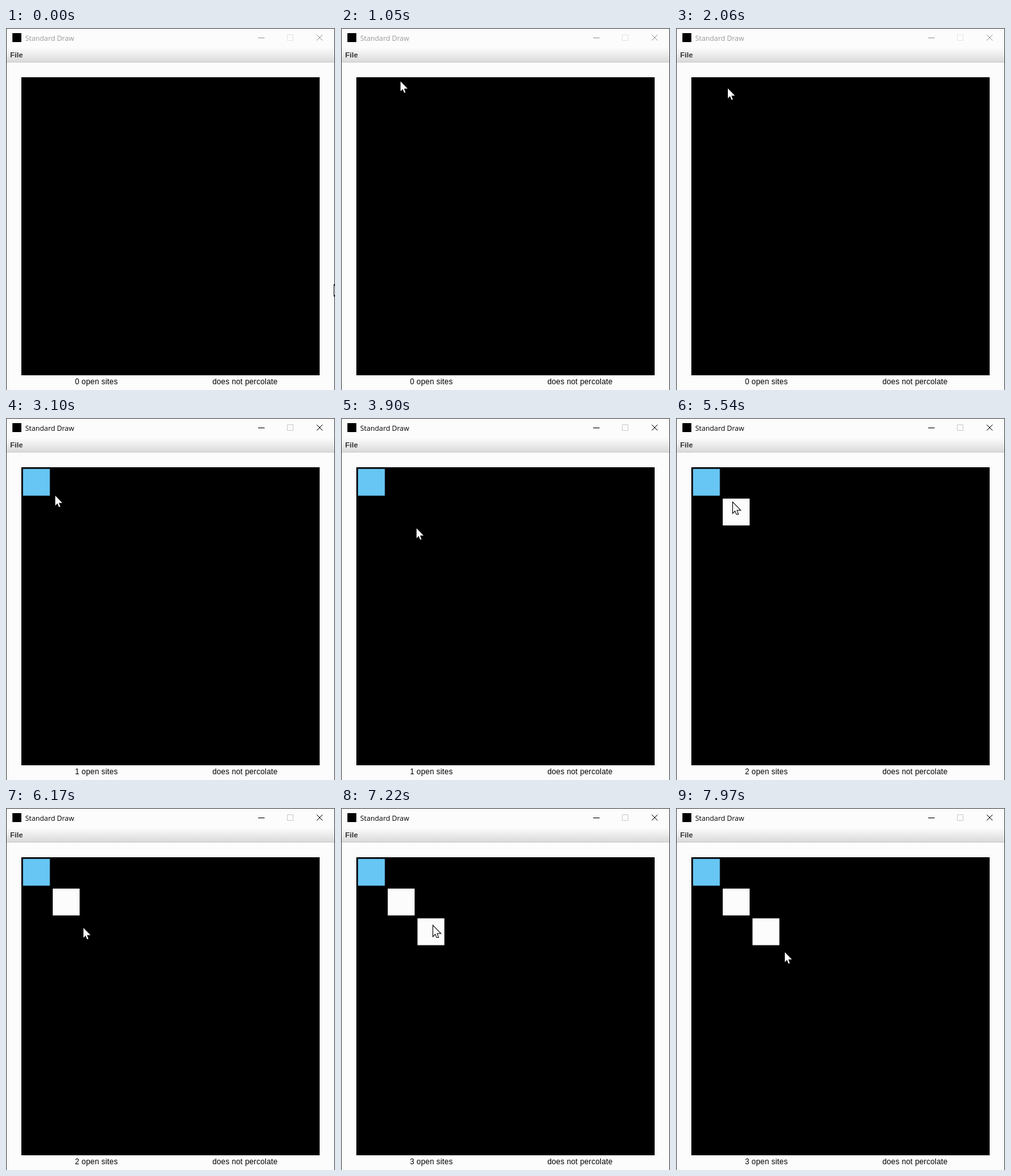
An HTML page for the animation above (8 s loop, 514x566 px).

```html
<!DOCTYPE html>
<html lang="en">
<head>
<meta charset="utf-8">
<title>Percolation</title>
<style>
  html, body { margin: 0; width: 100%; height: 100%; overflow: hidden; background: #fcfcfc; }
  svg { display: block; width: 514px; height: 566px; }
  #frame { --ink: #999; --box: #e4e4e4; }
  #frame.active { --ink: #000; --box: #ccc; }
  .title { font: 11px "Open Sans", "Noto Sans", sans-serif; fill: var(--ink); }
  .menu { font: bold 11.5px "Liberation Sans", Arial, sans-serif; fill: #333; }
  .status { font: 12px "Liberation Sans", Arial, sans-serif; letter-spacing: .18px; text-anchor: middle; }
</style>
</head>
<body>
<svg id="frame" viewBox="0 0 514 566">
  <defs>
    <linearGradient id="bar" x2="0" y2="1">
      <stop offset="0" stop-color="#fcfcfc"/>
      <stop offset="1" stop-color="#dadada"/>
    </linearGradient>
  </defs>
  <rect width="514" height="566" fill="#fcfcfc"/>
  <rect x="1" y="31" width="512" height="22" fill="url(#bar)"/>
  <path d="M1 53.5H513" stroke="#ccc"/>
  <path d="M.5 566V.5H513.5V566" fill="none" stroke="#444"/>

  <rect x="10" y="8" width="14" height="14"/>
  <text class="title" x="30" y="20">Standard Draw</text>
  <path d="M394 15.5H404M485.5 10.5l9 9m0-9l-9 9" stroke="var(--ink)"/>
  <path d="M439.5 10.5h9v9h-9z" fill="none" stroke="var(--box)"/>
  <text class="menu" x="6.6" y="46">File</text>

  <rect x="24" y="77" width="466" height="466"/>
  <g id="cells"></g>
  <text class="status" id="count" x="141.2" y="557">0 open sites</text>
  <text class="status" x="373.4" y="557">does not percolate</text>
  <path id="cursor" d="M0-.5V15L3.4 11.5 5.6 17H7.8L5.6 10.8H11Z"
        fill="#fcfcfc" stroke="#000" stroke-width="2" paint-order="stroke"/>
</svg>
<script>
const LOOP = 8000, ACTIVE_AT = 2690, CELL = 46.5;
const openTimes = [2730, 5450, 7220];
const home = [513, 403];
// Pointer moves: start, end, x, y; it rests in between
const moves = [
  [130, 1050, 93, 84],
  [1640, 2060, 81, 95], [2060, 2390, 62, 92],
  [2900, 3100, 77, 122], [3100, 3610, 103, 159], [3820, 3990, 135, 188],
  [4160, 4660, 94, 148], [4910, 5030, 89, 133],
  [5670, 6170, 121, 188], [6170, 6500, 144, 185],
  [7470, 7970, 170, 226]
];
const get = id => document.getElementById(id);
const frame = get("frame"), count = get("count"), cursor = get("cursor");

const cells = openTimes.map((_, i) => {
  const cell = document.createElementNS(frame.namespaceURI, "rect");
  const attrs = {
    x: 26.5 + CELL * i, y: 79.5 + CELL * i,
    width: 42, height: 42, fill: i ? "#fcfcfc" : "#67c6f3"
  };
  for (const key in attrs) cell.setAttribute(key, attrs[key]);
  get("cells").append(cell);
  return cell;
});

function pointerAt(t) {
  let [x, y] = home;
  for (const [start, end, toX, toY] of moves) {
    const k = Math.min(1, Math.max(0, (t - start) / (end - start)));
    x += (toX - x) * k;
    y += (toY - y) * k;
  }
  return [Math.round(x), Math.round(y)];
}

function draw(now) {
  const t = now % LOOP;
  frame.classList.toggle("active", t >= ACTIVE_AT);
  cells.forEach((cell, i) => cell.setAttribute("visibility", t >= openTimes[i] ? "visible" : "hidden"));
  count.textContent = openTimes.filter(at => t >= at).length + " open sites";
  cursor.setAttribute("transform", `translate(${pointerAt(t)})`);
}

const start = performance.now();
function tick() {
  draw(performance.now() - start);
  requestAnimationFrame(tick);
}
tick();
</script>
</body>
</html>
```
